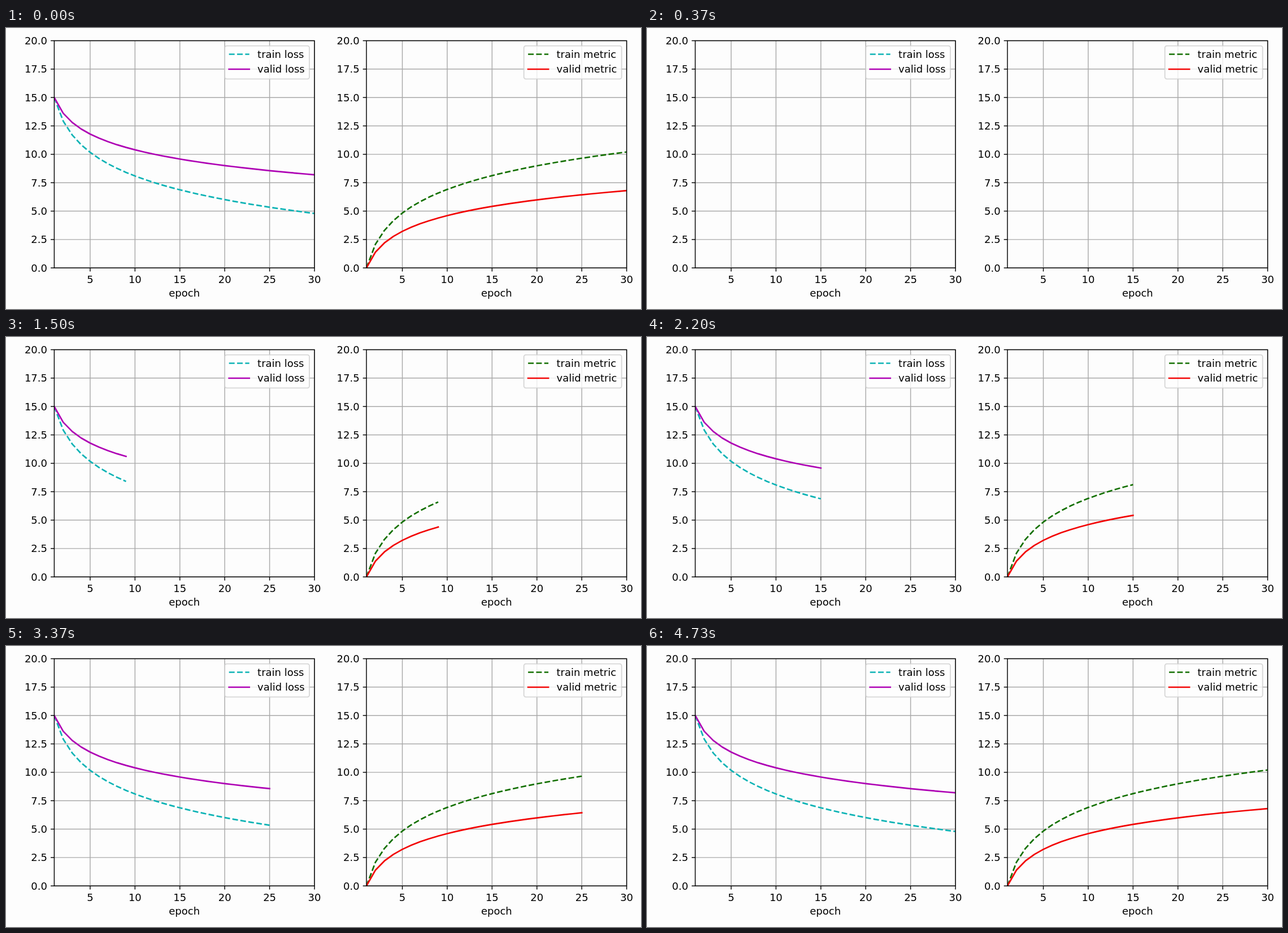
An HTML page that plays this animation: 1124 px wide and 498 px high, repeating every 4760 ms.

```html
<!DOCTYPE html>
<html lang="en">
<head>
<meta charset="utf-8">
<title>Training curves</title>
<style>
  html, body { margin: 0; width: 100%; height: 100%; overflow: hidden; background: #fdfdfd; }
  svg { display: block; width: 1124px; height: 498px; }
  text { font: 18px "DejaVu Sans", sans-serif; fill: #000; }
  .grid { stroke: #a9a9a9; stroke-width: 1.45; }
  .axis { stroke: #000; stroke-width: 1.45; fill: none; }
  .curve { fill: none; stroke-width: 2.7; stroke-linejoin: round; stroke-linecap: square; }
  .dashed { stroke-dasharray: 10 4.32; stroke-linecap: butt; }
  .legend { fill: #fff; fill-opacity: .8; stroke: #ccc; stroke-opacity: .8; stroke-width: 1.8; }
</style>
</head>
<body>
<svg viewBox="0 0 1124 498"><g id="stage"></g></svg>
<script>
const LOOP = 4760, CLEAR = 200, SHOW = 370;
const START = 430, STEP = 120, EPOCHS = 30;
const TOP = 22.5, BOTTOM = 425.2, WIDTH = 460.6;

const panels = [
  { left: 85.4, legend: [387.3, 149.7], series: [
    { name: "train loss", color: "#0cb3b5", dashed: true, f: n => 15 - 3 * Math.log(n) },
    { name: "valid loss", color: "#ae00b4", f: n => 15 - 2 * Math.log(n) } ] },
  { left: 638, legend: [916.7, 173], series: [
    { name: "train metric", color: "#147000", dashed: true, f: n => 3 * Math.log(n) },
    { name: "valid metric", color: "#f20404", f: n => 2 * Math.log(n) } ] }
];

const stage = document.getElementById("stage");
const curves = [];

function add(parent, tag, attrs, text) {
  const el = document.createElementNS("http://www.w3.org/2000/svg", tag);
  for (const k in attrs) el.setAttribute(k, attrs[k]);
  if (text) el.textContent = text;
  return parent.appendChild(el);
}
const line = (g, cls, x1, y1, x2, y2) => add(g, "line", { class: cls, x1, y1, x2, y2 });
const label = (g, x, y, text, anchor) => add(g, "text", { x, y, "text-anchor": anchor }, text);
const yAt = v => BOTTOM - v * (BOTTOM - TOP) / 20;

function buildPanel({ left, legend, series }, i) {
  const g = add(stage, "g", {});
  const right = left + WIDTH;
  const xAt = n => left + (n - 1) * WIDTH / (EPOCHS - 1);
  const box = { x: left, y: TOP, width: WIDTH, height: BOTTOM - TOP };
  add(add(g, "clipPath", { id: "clip" + i }), "rect", box);

  for (let n = 5; n <= EPOCHS; n += 5) {
    line(g, "grid", xAt(n), TOP, xAt(n), BOTTOM);
    line(g, "axis", xAt(n), BOTTOM, xAt(n), BOTTOM + 6.3);
    label(g, xAt(n), 451.5, n, "middle");
  }
  for (let v = 0; v <= 20; v += 2.5) {
    line(g, "grid", left, yAt(v), right, yAt(v));
    line(g, "axis", left - 6.3, yAt(v), left, yAt(v));
    label(g, left - 12.4, yAt(v) + 6.6, v.toFixed(1), "end");
  }
  label(g, left + WIDTH / 2, 476, "epoch", "middle");

  const plot = add(g, "g", { "clip-path": `url(#clip${i})` });
  const styleOf = s => ({ class: "curve" + (s.dashed ? " dashed" : ""), stroke: s.color });
  for (const s of series)
    curves.push({ el: add(plot, "polyline", styleOf(s)), f: s.f, xAt });
  add(g, "rect", { class: "axis", ...box });

  const [lx, lw] = legend;
  add(g, "rect", { class: "legend", x: lx, y: 31.6, width: lw, height: 58.8, rx: 3.6 });
  series.forEach((s, k) => {
    const y = 46.5 + k * 26.5;
    add(g, "line", { ...styleOf(s), x1: lx + 7.4, x2: lx + 43.4, y1: y, y2: y });
    label(g, lx + 57.8, y + 6.2, s.name, "start");
  });
}

function drawTo(epoch) {
  for (const { el, f, xAt } of curves) {
    const pts = [];
    for (let n = 1; n <= epoch && epoch > 1; n++) pts.push(xAt(n).toFixed(2) + "," + yAt(f(n)).toFixed(2));
    el.setAttribute("points", pts.join(" "));
  }
}

let shown = -1;
function render(t) {
  // 0 means an empty stage
  let epoch = EPOCHS;
  if (t >= CLEAR) {
    const n = 1 + Math.floor((t - START) / STEP);
    epoch = t < SHOW ? 0 : Math.max(1, Math.min(EPOCHS, n));
  }
  if (epoch === shown) return;
  shown = epoch;
  stage.style.visibility = epoch ? "visible" : "hidden";
  drawTo(epoch);
}

panels.forEach(buildPanel);
render(0);
const begin = performance.now();
function tick() {
  render((performance.now() - begin) % LOOP);
  requestAnimationFrame(tick);
}
requestAnimationFrame(tick);
</script>
</body>
</html>
```
